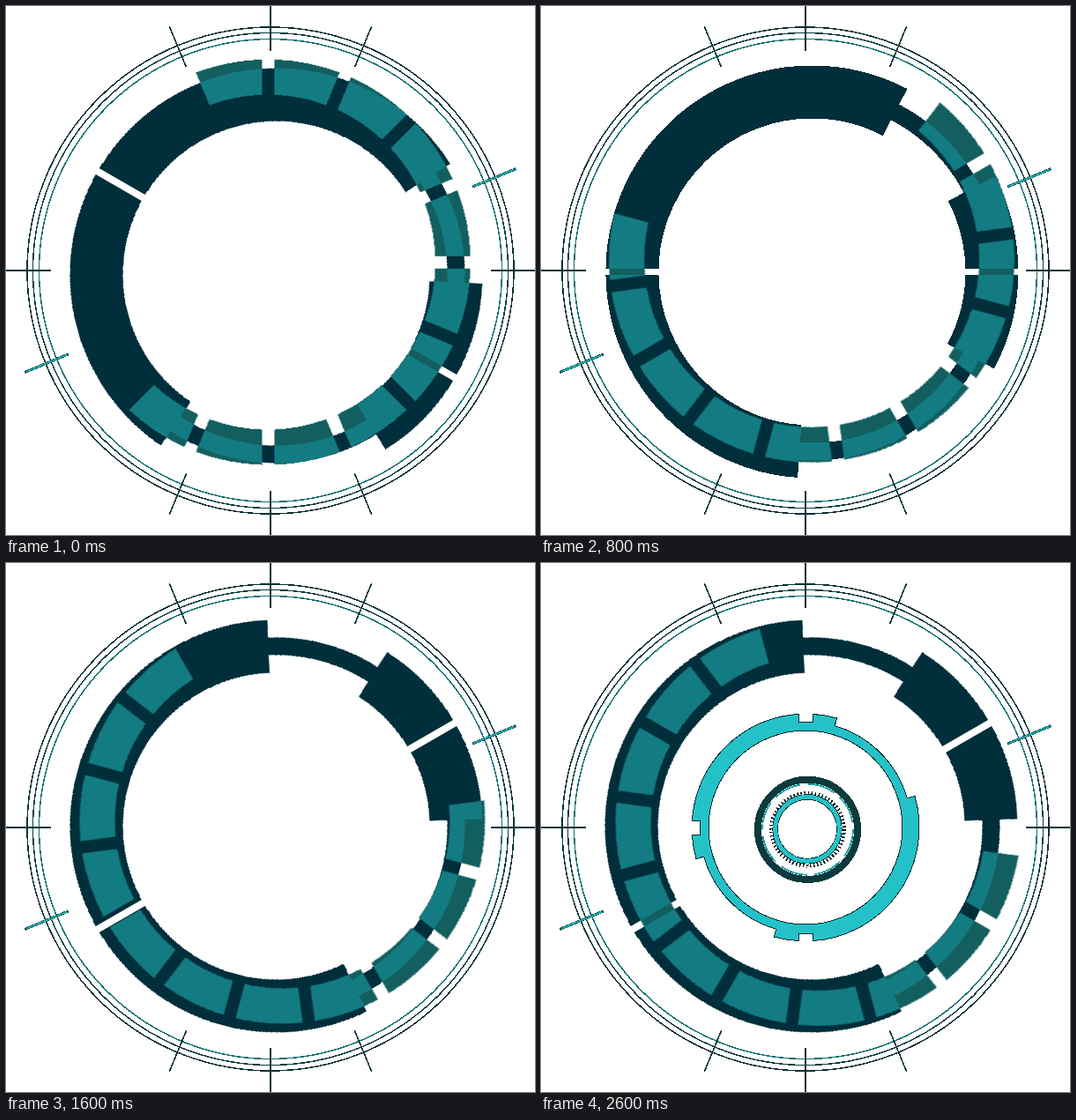
These frames come from a looping animation (600x600 px, 2800 ms). An HTML page without scripts:

```html
<!DOCTYPE html>
<html lang="en">
<head>
<meta charset="utf-8">
<title>Dial</title>
<style>
  html, body { margin: 0; width: 100%; height: 100%; overflow: hidden; background: #fff; }
  svg { display: block; width: 600px; height: 600px; shape-rendering: crispEdges; }
  .line { fill: none; }
  .dial { isolation: isolate; }
  .blocks { fill: #135f5f; mix-blend-mode: screen; }
</style>
</head>
<body>
<svg viewBox="0 0 600 600">
  <defs>
    <path id="tick" d="M0-300V-249.5"/>
    <!-- one block with sides parallel to its neighbours' sides -->
    <path id="block" d="M-38-226.8A230 230 0 0 1 38-226.8L30.2-187.6A190 190 0 0 0-30.2-187.6Z"/>
    <g id="four">
      <use href="#block" transform="rotate(-11.25)"/>
      <use href="#block" transform="rotate(11.25)"/>
      <use href="#block" transform="rotate(33.75)"/>
      <use href="#block" transform="rotate(56.25)"/>
    </g>
    <mask id="split" maskUnits="userSpaceOnUse" x="-240" y="-240" width="480" height="480">
      <path fill="#fff" d="M-240-240H240V240H-240Z"/>
      <path stroke="#000" stroke-width="7.6" d="M-240 0H240"/>
    </mask>
  </defs>

  <!-- outer scale -->
  <g class="line" transform="translate(300 300)">
    <g stroke-width="1.5">
      <circle r="276" stroke="#0a3032"/>
      <circle r="269.5" stroke="#0a3d3f"/>
      <circle r="262.5" stroke="#0f7072"/>
    </g>
    <g stroke="#0a3336" stroke-width="1.6">
      <animate attributeName="stroke" dur="2.8s" repeatCount="indefinite" calcMode="discrete"
        values="#0a3336;#0a3336;#0d5553;#0d5553;#0a3336;#0a3336;#0d5553;#0d5553;#0a3336;#0a3336;#0d5553;#0d5553;#0d5553;#0a3336"/>
      <use href="#tick"/>
      <use href="#tick" transform="rotate(22.5)"/>
      <use href="#tick" transform="rotate(90)"/>
      <use href="#tick" transform="rotate(157.5)"/>
      <use href="#tick" transform="rotate(180)"/>
      <use href="#tick" transform="rotate(202.5)"/>
      <use href="#tick" transform="rotate(270)"/>
      <use href="#tick" transform="rotate(337.5)"/>
    </g>
    <g stroke="#0c5558" stroke-width="3" stroke-linecap="square">
      <use href="#tick" transform="rotate(67.5)"/>
      <use href="#tick" transform="rotate(247.5)"/>
    </g>
    <g stroke="#22b2b5" stroke-width="1.5">
      <use href="#tick" transform="rotate(67.5)"/>
      <use href="#tick" transform="rotate(247.5)"/>
    </g>
  </g>

  <!-- both wheels turn about points off their own centres -->
  <g class="dial">
    <g transform="translate(301.2 301.5)">
      <g>
        <animateTransform attributeName="transform" type="rotate" dur="2.8s" repeatCount="indefinite" calcMode="discrete"
          values="30;30;15;15;0;0;-15;-15;-30;-30;-30;-30;-30;-30"/>
        <g class="line" stroke="#002e3a" transform="translate(6.2)" mask="url(#split)">
          <circle r="204" stroke-width="20"/>
          <circle r="204" stroke-width="60" pathLength="360"
            stroke-dasharray="55.5 66 203.5 35" transform="rotate(-27.5)"/>
        </g>
      </g>
    </g>
    <g class="blocks" transform="translate(304.45 297.8)">
      <g>
        <animateTransform attributeName="transform" type="rotate" dur="2.8s" repeatCount="indefinite" calcMode="discrete"
          values="0;15;30;45;60;75;90;105;105;120;120;120;120;120"/>
        <g transform="translate(-7.45 -7.3)">
          <use href="#four"/>
          <use href="#four" transform="rotate(90)"/>
          <use href="#block" transform="rotate(168.75)"/>
          <use href="#block" transform="rotate(191.25)"/>
          <use href="#block" transform="rotate(213.75)"/>
        </g>
      </g>
    </g>
  </g>

  <!-- hub -->
  <g class="line" transform="translate(302.5 302.3)" opacity="0">
    <animate attributeName="opacity" dur="2.8s" repeatCount="indefinite" calcMode="discrete"
      values="0;0;0;0;0;0;0;0;0;0;1;1;1;1"/>
    <circle r="56.6" stroke="#0c3a3d" stroke-width="8"/>
    <circle r="51.5" stroke="#1c9fa2" stroke-width="1.8" pathLength="80" stroke-dasharray="8 2"/>
    <circle r="41.3" stroke="#061a1c" stroke-width="4" pathLength="64" stroke-dasharray=".4 .6"/>
    <g transform="translate(-.5 -.5)">
      <circle r="36.4" stroke="#062a2c" stroke-width="6.6"/>
      <circle r="36.4" stroke="#24c2c8" stroke-width="5"/>
    </g>
  </g>

  <!-- notched ring closing in -->
  <g transform="translate(300 300)" opacity="0">
    <animate attributeName="opacity" dur="2.8s" repeatCount="indefinite" calcMode="discrete"
      values="0;0;0;0;0;0;0;0;0;0;0;1;1;1"/>
    <g>
      <animateTransform attributeName="transform" type="scale" dur="2.8s" repeatCount="indefinite" calcMode="discrete"
        keyTimes="0;.8571;.9285" values="1.44;1.2;1"/>
      <path fill="#24c2c8" fill-rule="evenodd" stroke="#062a2c"
        d="M8-128.6A129 129 0 0 1 35.6-124L33.1-115.3A120 120 0 0 1 115.3-33.1L124-35.6A129 129 0 0 1 8 128.6V120H-8V128.6A129 129 0 0 1-35.6 124L-33.1 115.3A120 120 0 0 1-115.3 33.1L-124 35.6A129 129 0 0 1-128.6 8H-120V-8H-128.6A129 129 0 0 1-8-128.6V-120H8Z
           M-110 0A110 110 0 0 0 110 0A110 110 0 0 0-110 0Z"/>
    </g>
  </g>
</svg>
</body>
</html>
```
